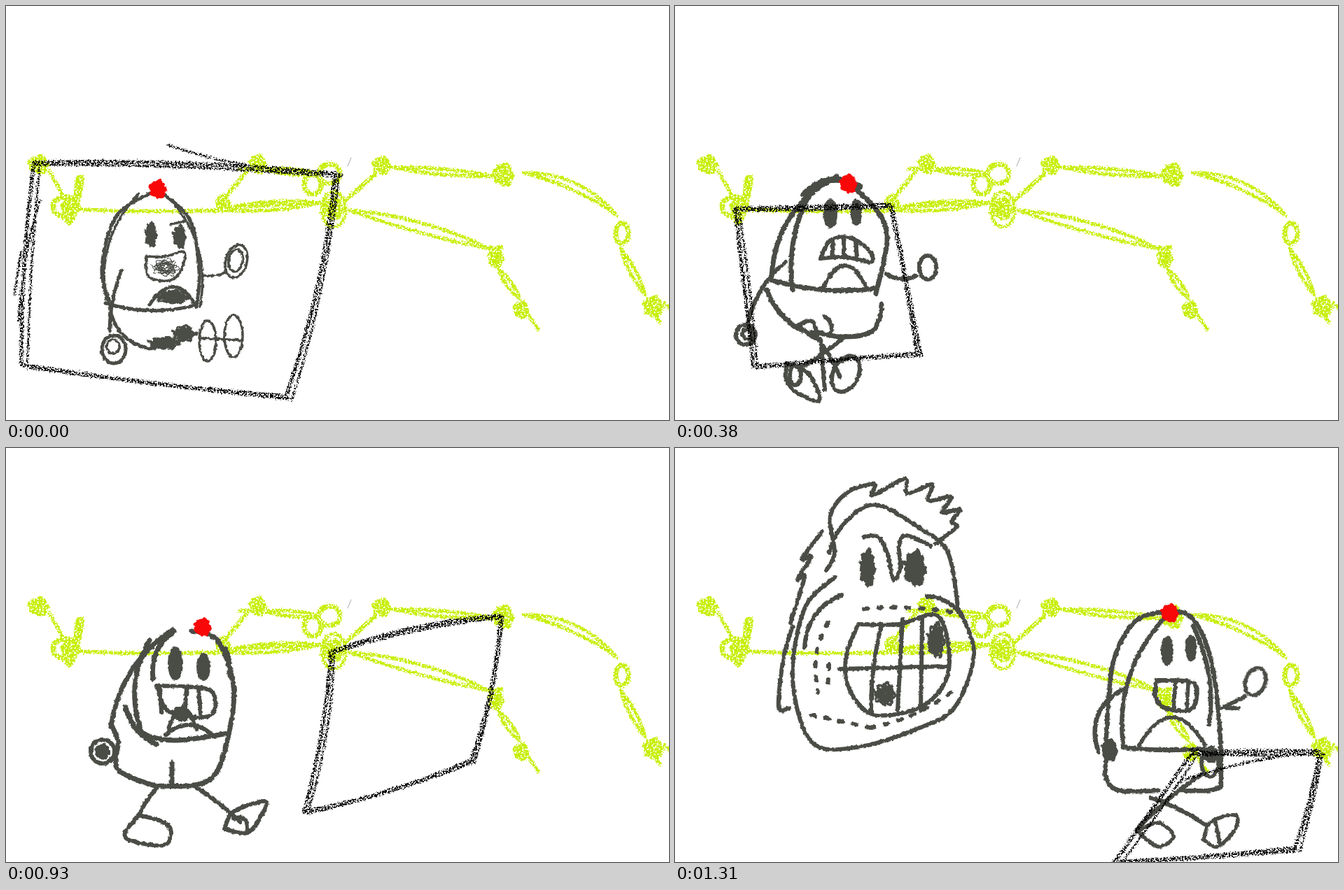
Recreate the animation shown at these times as an HTML page. Size 947x592 px, loop 1.48 s.

```html
<!DOCTYPE html>
<html lang="en">
<head>
<meta charset="utf-8">
<title>Rough pencil test</title>
<style>
html, body { margin: 0; width: 100%; height: 100%; overflow: hidden; background: #fff; }
svg { display: block; width: 100vw; height: 100vh; fill: none; stroke-linecap: round; stroke-linejoin: round; }
.green { stroke: #c6ee00; filter: url(#chalk); }
.ink { stroke: #4a4c46; filter: url(#brush); }
.box { stroke: #000; filter: url(#pencil); }
.red { stroke: #f80808; filter: url(#brush); }
</style>
</head>
<body>
<svg id="stage" viewBox="0 0 947 592"></svg>
<script>
const LOOP = 1480;
const stage = document.getElementById('stage');
let pen = 5, out = '';

const path = (d, extra = '') => { out += `<path d="${d}" stroke-width="${pen}" ${extra}/>`; };

// Smooth stroke through points.
function line(...n) {
  const pts = [];
  for (let i = 0; i < n.length; i += 2) pts.push([n[i], n[i + 1]]);
  const at = i => pts[Math.max(0, Math.min(pts.length - 1, i))];
  const mix = (p, q, r) => p.map((v, k) => (v + (q[k] - r[k]) / 6).toFixed(1));
  let d = 'M' + pts[0];
  for (let i = 0; i < pts.length - 1; i++) {
    const [a, b, c, e] = [at(i - 1), at(i), at(i + 1), at(i + 2)];
    d += `C${mix(b, c, a)} ${mix(c, b, e)} ${c}`;
  }
  path(d);
}
const loop = (x, y, ...rest) => line(x, y, ...rest, x, y);

// Bent stroke; a positive sag bulges to the left of its direction.
function bow(x1, y1, x2, y2, sag = 0, extra) {
  const dx = x2 - x1, dy = y2 - y1, k = 2 * sag / Math.hypot(dx, dy);
  path(`M${x1} ${y1}Q${(x1 + x2) / 2 + dy * k} ${(y1 + y2) / 2 - dx * k} ${x2} ${y2}`, extra);
}
const dots = (x1, y1, x2, y2, sag) => bow(x1, y1, x2, y2, sag, 'stroke-dasharray="5 15"');

function ring(x, y, rx, ry, tilt = 0, extra = '') {
  out += `<ellipse cx="${x}" cy="${y}" rx="${rx}" ry="${ry}" stroke-width="${pen}" transform="rotate(${tilt} ${x} ${y})" ${extra}/>`;
}
const disc = (x, y, rx, ry) => ring(x, y, rx - pen / 2, ry - pen / 2, 0, 'fill="#4a4c46"');
const mask = (x, y, rx, ry) => ring(x, y, rx, ry, 0, 'fill="#fff" stroke="none"');

function blob(x, y, rx, ry) {
  const n = [];
  for (let i = 0; i < 26; i++) {
    const r = Math.sqrt((i + .5) / 26), a = i * 2.4;
    n.push(x + Math.max(1, rx - pen / 2) * r * Math.cos(a), y + Math.max(1, ry - pen / 2) * r * Math.sin(a));
  }
  line(...n);
}

function bone(x1, y1, x2, y2, sag = 0, gap = 1) {
  bow(x1, y1, x2, y2, sag + gap);
  bow(x1, y1, x2, y2, sag - gap);
}

// Four sketchy edges, clockwise; positive sags bulge outwards.
function box(corners, sags, loose) {
  const wobble = k => Math.sin(k * 12.9) * loose;
  corners.forEach(([x1, y1], i) => {
    const [x2, y2] = corners[(i + 1) % 4];
    pen = 5.5;
    bow(x1, y1, x2, y2, sags[i]);
    pen = 3.5;
    bow(x1 + wobble(i + 1), y1 + wobble(i + 2) / 2, x2 + wobble(i + 3), y2 + wobble(i + 4) / 2, sags[i] - 2);
  });
}

function skeleton() {
  pen = 7;
  blob(47, 227, 17, 16); blob(91, 289, 14, 19); blob(360, 226, 14, 16); blob(467, 289, 18, 19);
  blob(537, 228, 15, 15); blob(711, 241, 17, 20); blob(925, 430, 17, 18); blob(700, 360, 13, 17);
  blob(736, 434, 13, 15); blob(310, 282, 12, 15);
  ring(85, 287, 18, 14); ring(462, 240, 15, 14); ring(438, 255, 12, 14); ring(880, 325, 9, 15);
  pen = 12;
  bow(106, 247, 90, 307, 2);
  pen = 5;
  ring(468, 291, 17, 25);
  bow(333, 233, 350, 232); bow(925, 440, 934, 453); bow(940, 425, 946, 431);
  bow(686, 346, 708, 345); bow(745, 440, 760, 462); bow(62, 236, 85, 278);
  bone(108, 291, 305, 292, -2, 0);
  bone(305, 291, 450, 281, 0, 6); bow(320, 288, 450, 281);
  bone(316, 270, 345, 235);
  bone(372, 234, 445, 240, 0, 4);
  bone(485, 278, 528, 240);
  bone(552, 231, 695, 243, 0, 4);
  bone(738, 238, 872, 299, 12, 5);
  bone(878, 347, 913, 413, 0, 4);
  bone(490, 292, 690, 347, 3, 7);
  bone(704, 377, 733, 418, 0, 4);
}

function happy() {
  pen = 5;
  line(213, 264, 158, 300, 137, 375, 150, 432);
  line(215, 262, 262, 305, 276, 380, 272, 430);
  bow(142, 425, 270, 428, -9); bow(148, 430, 205, 490, -14);
  bow(165, 378, 148, 465, -4); bow(205, 427, 272, 430, 27);
  bow(205, 490, 272, 468, -3);
  ring(154, 491, 17, 20);
  pen = 3.5;
  bow(190, 268, 143, 420, -20); bow(228, 270, 277, 430, 22);
  ring(153, 487, 9, 10); blob(238, 416, 28, 12);
  blob(207, 327, 10, 21); blob(248, 330, 11, 20); bow(235, 312, 255, 308);
  loop(200, 358, 203, 386, 230, 393, 248, 382, 255, 352, 228, 358);
  bow(282, 385, 315, 380, -3); ring(329, 365, 15, 24, 15); ring(328, 364, 10, 16, 10);
  blob(226, 482, 26, 11); blob(254, 468, 19, 14);
  ring(288, 479, 12, 29); ring(325, 472, 13, 30); bow(278, 475, 337, 478);
  pen = 1.3;
  blob(228, 374, 23, 15);
}

function shocked() {
  pen = 5;
  line(180, 262, 145, 290, 129, 360, 140, 420);
  line(225, 262, 262, 285, 284, 365, 265, 455);
  bow(225, 275, 248, 425, 14); bow(140, 418, 250, 425, -8); bow(140, 425, 185, 493, -12);
  bow(175, 490, 270, 488, -2);
  bow(160, 428, 230, 428, 36);
  bow(128, 385, 103, 425, -4); bow(268, 380, 310, 420, 6);
  ring(106, 439, 18, 20); blob(217, 327, 14, 18);
  pen = 4;
  bow(215, 262, 132, 340, -14); bow(232, 275, 262, 330, 3); bow(240, 345, 240, 420);
  bow(140, 420, 215, 433); bow(250, 425, 285, 422);
  ring(202, 364, 10, 13); ring(106, 441, 10, 12); ring(316, 429, 10, 12);
  bow(198, 488, 230, 468, 9); bow(236, 485, 262, 465, 8); bow(200, 486, 240, 480);
  loop(266, 462, 285, 450, 300, 465, 305, 515, 275, 515);
  line(312, 465, 320, 452, 347, 457, 345, 500, 325, 517, 313, 508); bow(311, 464, 308, 500);
  pen = 2.5;
  blob(172, 328, 12, 19);
}

function uneasy() {
  pen = 7;
  bow(245, 258, 152, 400, -24); bow(215, 268, 182, 420, -14);
  line(272, 275, 305, 310, 317, 350, 301, 425);
  bow(148, 405, 300, 418, -8);
  line(309, 440, 306, 462, 290, 482, 250, 487, 215, 480);
  bow(145, 420, 195, 478, -7);
  disc(236, 311, 10, 21); disc(273, 309, 8, 19);
  pen = 9;
  bow(198, 283, 278, 272, 15);
  pen = 6;
  loop(222, 375, 235, 350, 262, 345, 290, 362, 294, 380, 258, 373);
  bow(240, 350, 238, 373); bow(255, 347, 255, 373); bow(272, 350, 274, 375);
  bow(225, 418, 288, 418, 33);
  bow(172, 380, 118, 468, -9); ring(115, 484, 14, 14); ring(117, 483, 7, 7);
  bow(316, 397, 358, 400, -6); ring(375, 388, 12, 17);
  loop(190, 470, 210, 465, 216, 490); bow(228, 458, 235, 485, 6);
  bow(210, 480, 250, 545, 3); bow(255, 488, 195, 530, 2); bow(222, 490, 228, 563);
  loop(175, 525, 172, 545, 185, 565, 220, 578, 205, 540); ring(186, 542, 8, 14);
  ring(258, 540, 18, 27, 25); bow(240, 525, 262, 518);
}

function stroll() {
  pen = 7;
  bow(238, 260, 150, 398, -18); bow(205, 275, 195, 410, -16); bow(240, 262, 210, 330, -11);
  line(265, 262, 302, 275, 325, 340, 318, 410, 300, 465, 270, 482, 215, 483);
  line(172, 375, 190, 405, 240, 418, 318, 408); bow(170, 370, 215, 424, -8);
  line(150, 395, 160, 420, 160, 460, 215, 484); bow(237, 450, 237, 482);
  disc(242, 308, 11, 24); disc(282, 313, 10, 20); bow(314, 288, 319, 325, 2);
  pen = 6;
  loop(215, 340, 230, 375, 270, 385, 295, 380, 298, 355, 280, 343);
  bow(220, 340, 222, 378); bow(258, 342, 256, 370); bow(275, 345, 278, 380);
  blob(250, 380, 15, 13); bow(228, 410, 295, 410, 14); bow(232, 402, 272, 402, 30);
  ring(138, 434, 17, 17); blob(138, 434, 12, 13);
  bow(215, 487, 190, 525, -2); loop(190, 525, 225, 535, 236, 550, 225, 568, 180, 562, 170, 550);
  bow(270, 484, 335, 535, 2);
  loop(312, 545, 325, 520, 370, 505, 365, 525, 345, 550); bow(325, 530, 345, 545, 9);
}

function bullyNear() {
  mask(172, 298, 58, 45);
  pen = 6;
  line(50, 122, 75, 93, 88, 97, 102, 67, 106, 97, 130, 76, 138, 87, 160, 77, 153, 102,
    193, 83, 195, 103, 216, 98, 185, 133, 217, 133, 188, 160);
  line(50, 122, 38, 170, 30, 230, 16, 285, 25, 330, 58, 390); bow(55, 122, 88, 150, 5);
  bow(88, 150, 47, 320, -14); bow(78, 150, 206, 210, 34);
  bow(90, 245, 68, 290, -5); bow(58, 330, 85, 380, -3); bow(228, 275, 165, 410, 18);
  line(53, 300, 62, 380, 75, 418, 150, 415, 190, 380, 225, 330, 232, 285, 220, 215, 188, 213);
  bow(83, 178, 130, 188, 14); bow(130, 188, 180, 155, 10);
  blob(106, 205, 13, 22); blob(150, 196, 10, 18);
  loop(95, 262, 88, 300, 95, 345, 125, 370, 160, 368, 190, 330, 198, 280, 192, 240, 150, 246);
  bow(110, 262, 155, 360, 3); bow(142, 248, 175, 355, -2); bow(95, 320, 196, 280); bow(165, 250, 190, 330);
  dots(110, 240, 205, 225, 5); dots(208, 230, 210, 290, 4); dots(76, 305, 95, 380, -5); dots(95, 408, 180, 390, 8);
  pen = 4;
  blob(163, 270, 11, 24); blob(125, 342, 18, 22);
}

function alarmed() {
  mask(522, 300, 24, 28);
  pen = 7;
  line(425, 265, 395, 290, 380, 340, 372, 400, 385, 495);
  bow(425, 265, 508, 250, 16); line(430, 262, 470, 257, 525, 280, 545, 350, 535, 420);
  line(535, 255, 572, 295, 566, 410); bow(551, 335, 545, 430, 3); bow(525, 290, 540, 320, 3);
  bow(375, 435, 480, 450, -2); bow(415, 430, 545, 415, -12);
  bow(385, 497, 490, 465, -14); line(480, 500, 520, 502, 558, 490, 575, 430); bow(551, 420, 540, 490, 3);
  blob(432, 320, 14, 22); blob(501, 318, 15, 21);
  pen = 6;
  bow(416, 430, 496, 430, 30);
  loop(405, 365, 415, 353, 450, 360, 508, 360, 500, 380, 460, 390, 410, 384);
  [425, 446, 475, 494].forEach(x => bow(x, 359, x, 386));
  bow(358, 385, 378, 382); bow(375, 385, 350, 435, 2); ring(343, 450, 11, 14);
  blob(530, 450, 16, 18); ring(530, 452, 14, 15);
  bow(432, 500, 455, 560, -2); bow(523, 505, 518, 545);
  ring(464, 563, 26, 20); ring(520, 564, 20, 16); blob(522, 569, 15, 9);
}

function bullyFar() {
  pen = 6;
  line(216, 175, 228, 150, 222, 97, 247, 63, 285, 52, 282, 68, 328, 44, 332, 65, 367, 52, 362, 75,
    394, 70, 382, 92, 407, 88, 395, 105, 402, 113, 372, 137);
  line(220, 150, 238, 112, 285, 81, 350, 115, 390, 150, 405, 235);
  line(210, 120, 182, 158, 195, 155, 175, 188, 185, 185, 165, 250); line(168, 255, 155, 300, 148, 370, 162, 372);
  line(228, 185, 185, 230, 168, 330, 195, 420, 260, 428, 350, 400, 400, 370, 427, 295, 408, 235);
  bow(360, 212, 410, 240, 7); bow(238, 210, 185, 285, -14);
  line(270, 127, 290, 127, 303, 150, 312, 188, 322, 170, 320, 140, 330, 125, 365, 140);
  blob(275, 172, 13, 31); blob(343, 172, 19, 30);
  loop(262, 252, 245, 295, 247, 340, 280, 380, 340, 375, 380, 345, 392, 300, 375, 240, 320, 252);
  bow(295, 252, 280, 378, -4); bow(325, 245, 318, 375); bow(353, 245, 351, 375); bow(235, 316, 390, 312);
  dots(218, 250, 205, 350, -10); dots(220, 310, 218, 345, 0); dots(270, 230, 400, 235, 4);
  dots(195, 382, 280, 400, 0); dots(280, 400, 400, 345, -8);
  pen = 4;
  blob(373, 275, 15, 30); blob(300, 352, 19, 20);
}

function relaxed() {
  pen = 6.5;
  line(690, 235, 655, 250, 625, 310, 615, 430); bow(700, 242, 640, 425, -22);
  line(690, 235, 735, 240, 765, 300, 778, 400, 780, 485); bow(740, 255, 763, 395, 11);
  bow(640, 345, 605, 435, -20); bow(640, 428, 755, 430, -3);
  line(618, 435, 615, 470, 635, 490, 690, 490); line(720, 490, 760, 490, 780, 485);
  disc(703, 290, 9, 21); disc(737, 286, 8, 19);
  loop(688, 332, 686, 355, 700, 372, 735, 375, 745, 355, 738, 335);
  blob(621, 432, 13, 18); blob(765, 438, 13, 14);
  bow(680, 500, 760, 540, 3); bow(755, 465, 660, 545, -4);
  pen = 5.5;
  bow(663, 425, 757, 425, 40); bow(715, 335, 712, 372); bow(733, 338, 731, 372);
  bow(780, 372, 805, 372); bow(785, 370, 815, 355); ring(829, 334, 14, 20, 20);
  ring(764, 450, 12, 20);
  loop(660, 548, 690, 570, 712, 555, 690, 536);
  loop(755, 560, 765, 535, 800, 525, 800, 545, 775, 570); bow(772, 535, 778, 565);
}

function cap(x, y) { pen = 7; blob(x, y, 14, 15); }

function record(name, draw, shift = '0') {
  out = '';
  draw();
  return `<g class="${name}"><g transform="translate(${shift})">${out}</g></g>`;
}
const pose = (at, ink, shift, frame, head) =>
  ({ at, svg: record('ink', ink, shift) + record('box', frame) + record('red', head) });

const poses = [
  pose(0, happy, '0', () => {
    box([[40, 224], [470, 240], [400, 558], [22, 513]], [7, 10, 4, 5], 9);
    bow(232, 199, 480, 241, -10); bow(48, 278, 18, 450, -5); bow(22, 350, 12, 412);
  }, () => cap(217, 262)),
  pose(210, shocked, '0', () => {
    box([[58, 220], [361, 228], [366, 430], [55, 438]], [2, 2, 0, 2], 5);
    bow(60, 222, 110, 220); bow(60, 207, 57, 260);
  }, () => cap(214, 265)),
  pose(380, uneasy, '-14 -14', () =>
    box([[86, 290], [307, 284], [346, 497], [112, 515]], [0, 2, 0, 0], 6), () => cap(248, 254)),
  pose(550, uneasy, '0', () => {
    box([[92, 288], [440, 253], [515, 447], [185, 540]], [7, 8, 2, 0], 7);
    bow(275, 251, 480, 254, -3); bow(125, 302, 250, 290); bow(245, 515, 450, 452, -6);
    pen = 6;
    bow(85, 289, 335, 276, -3); bow(170, 490, 215, 575);
  }, () => cap(262, 268)),
  pose(760, stroll, '0 2', () =>
    box([[305, 286], [537, 228], [634, 408], [378, 512]], [4, 3, 4, 0], 6), () => cap(280, 258)),
  pose(930, stroll, '0', () =>
    box([[464, 292], [706, 240], [664, 447], [426, 520]], [9, 8, 7, -6], 5), () => cap(281, 256)),
  pose(1140, () => { bullyNear(); alarmed(); }, '0', () =>
    box([[700, 360], [886, 322], [855, 455], [640, 530]], [2, 4, 7, 9], 5), () => cap(481, 249)),
  pose(1310, () => { bullyFar(); relaxed(); }, '0', () => {
    box([[738, 437], [920, 434], [885, 572], [628, 592]], [2, 4, 2, 0], 8);
    bow(725, 475, 900, 435, 4); bow(735, 431, 915, 436, -6);
  }, () => cap(707, 236))
];

const grain = (id, freq, push, gain, bias) =>
  `<filter id="${id}" filterUnits="userSpaceOnUse" x="0" y="0" width="947" height="592" color-interpolation-filters="sRGB">
    <feTurbulence type="fractalNoise" baseFrequency="${freq}" numOctaves="2" seed="4" result="n"/>
    <feDisplacementMap in="SourceGraphic" in2="n" scale="${push}" xChannelSelector="R" yChannelSelector="G" result="d"/>
    <feColorMatrix in="n" values="${'0 '.repeat(18)}${gain} ${bias}" result="g"/>
    <feComposite in="d" in2="g" operator="in"/>
  </filter>`;

stage.innerHTML = grain('chalk', .4, 6, 9, -3.2) + grain('brush', .22, 4, 0, 1) + grain('pencil', .45, 6, 10, -4.2)
  + record('green', skeleton) + '<path d="M493 217L488 229" stroke="#aaa"/>'
  + poses.map(p => `<g class="pose">${p.svg}</g>`).join('');

const groups = stage.querySelectorAll('.pose');
function tick() {
  const t = performance.now() % LOOP;
  const now = poses.findLastIndex(p => p.at <= t);
  groups.forEach((g, i) => g.setAttribute('display', i === now ? 'inline' : 'none'));
  requestAnimationFrame(tick);
}
tick();
</script>
</body>
</html>
```
